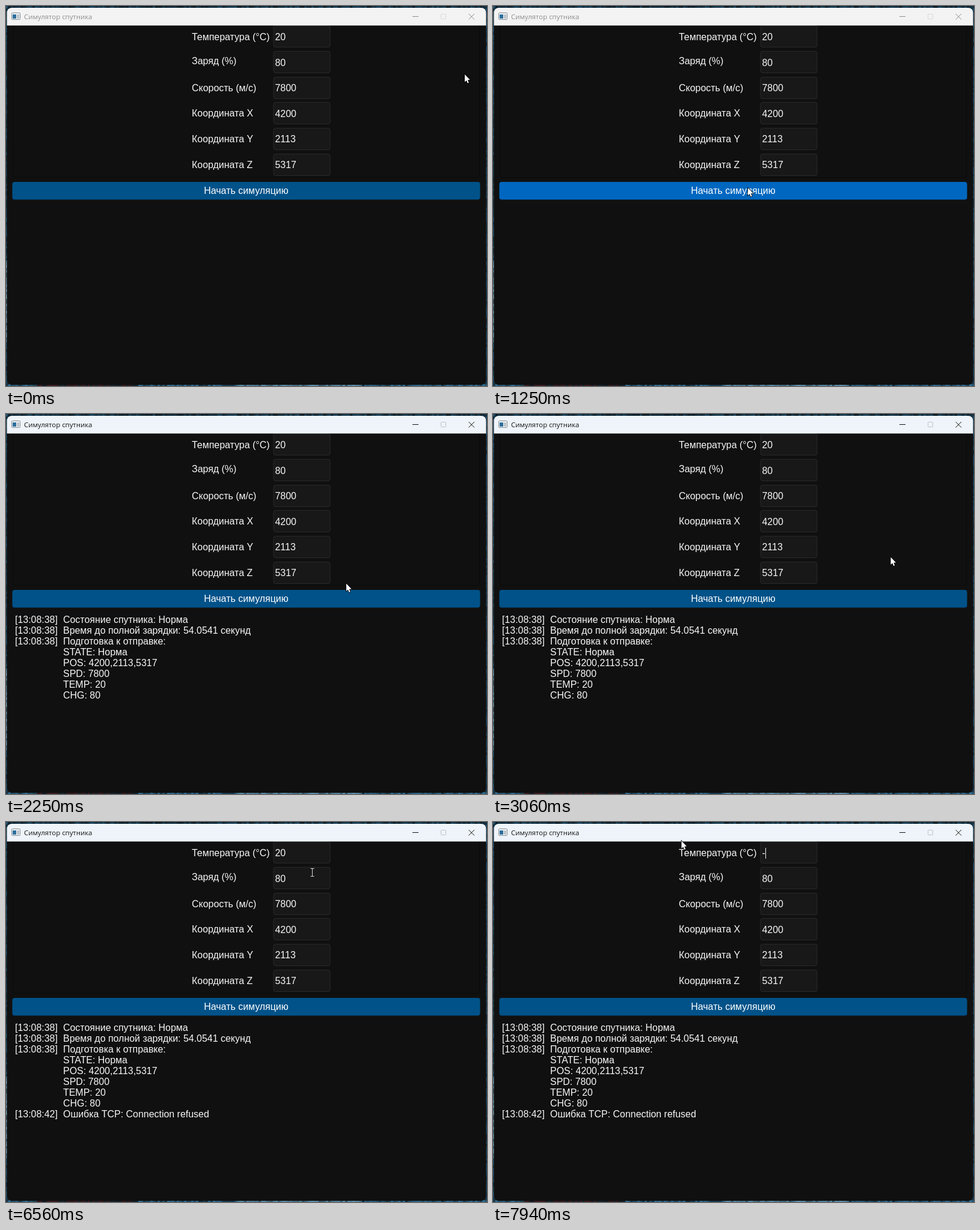
Write an HTML page with a canvas that moves like this. It is 800x633 px and loops after 8000 ms.

```html
<!DOCTYPE html>
<html lang="ru">
<head>
<meta charset="utf-8">
<title>Симулятор спутника</title>
<style>
html, body { margin: 0; width: 100%; height: 100%; overflow: hidden; background: #101010; }
canvas { display: block; }
</style>
</head>
<body>
<canvas id="stage" width="800" height="633"></canvas>
<script>
const LOOP = 8000, CLICK = 1500, REFUSED = 6000;
const DRAG = 6880, RELEASE = 7300, TYPED = 7680;
const SANS = '15.94px "Liberation Sans", Arial, sans-serif';
const c = document.getElementById('stage').getContext('2d');

// label, value, label baseline, field top, value baseline
const ROWS = [
  ['Температура (°C)', '20', 57, 33, 57],
  ['Заряд (%)', '80', 97, 76, 100],
  ['Скорость (м/с)', '7800', 142, 119, 142],
  ['Координата X', '4200', 184, 161, 185],
  ['Координата Y', '2113', 227, 204, 227],
  ['Координата Z', '5317', 270, 247, 270]
];
const LOG = [
  ['[13:08:38]', 'Состояние спутника: Норма'],
  ['[13:08:38]', 'Время до полной зарядки: 54.0541 секунд'],
  ['[13:08:38]', 'Подготовка к отправке:'],
  ['', 'STATE: Норма'],
  ['', 'POS: 4200,2113,5317'],
  ['', 'SPD: 7800'],
  ['', 'TEMP: 20'],
  ['', 'CHG: 80'],
  ['[13:08:42]', 'Ошибка TCP: Connection refused']
];
// pointer waypoints: time, x, y
const PATH = [
  [0, 763, 114], [60, 763, 114], [180, 756, 103], [810, 480, 288], [1250, 424, 303],
  [1500, 417, 310], [1750, 415, 311], [2440, 600, 276], [2780, 728, 262],
  [3060, 661.5, 238.5], [5750, 661.5, 238.5], [6500, 509, 84], [6600, 509, 84],
  [DRAG, 498, 52], [RELEASE, 313.5, 31.5], [LOOP, 313.5, 31.5]
];

function pointer(t) {
  const i = PATH.findIndex(p => p[0] > t);
  const [t0, x0, y0] = PATH[i - 1], [t1, x1, y1] = PATH[i];
  const u = (t - t0) / (t1 - t0), e = u * u * (3 - 2 * u);
  return [x0 + (x1 - x0) * e, y0 + (y1 - y0) * e];
}

function text(s, x, y, color = '#f8f8f8', font = SANS) {
  c.font = font;
  c.fillStyle = color;
  c.fillText(s, x, y);
}

function box(x, y, w, h, r, fill, stroke) {
  c.beginPath();
  c.roundRect(x, y, w, h, r);
  if (fill) { c.fillStyle = fill; c.fill(); }
  if (stroke) { c.strokeStyle = stroke; c.lineWidth = 1; c.stroke(); }
}

function line(color, ...points) {
  c.strokeStyle = color;
  c.lineWidth = 1;
  c.beginPath();
  for (let i = 0; i < points.length; i += 4) {
    c.moveTo(points[i], points[i + 1]);
    c.lineTo(points[i + 2], points[i + 3]);
  }
  c.stroke();
}

// mottled sea-coloured desktop visible around the window
function desktop() {
  const noise = n => { const v = Math.sin(n * 12.9898) * 43758.5453; return v - Math.floor(v); };
  c.fillStyle = '#123344';
  c.fillRect(0, 0, 800, 633);
  for (let i = 0; i < 200; i++) {
    const p = i * 4, n = noise(i + 1), m = noise(i + 301);
    c.fillStyle = `hsl(203 55% ${9 + n * 14}%)`;
    c.fillRect(p, 0, 4, 4);
    const dark = p > 50 && p < 220, foam = p > 380 && p < 590;
    c.fillStyle = dark ? `hsl(${m > .6 ? 350 : 205} 35% ${8 + m * 10}%)`
      : `hsl(202 ${foam ? 30 : 50}% ${(foam ? 28 : 14) + m * 26}%)`;
    c.fillRect(p, 630, 4, 3);
    const pale = p > 420 && p < 560;
    c.fillStyle = `hsl(202 ${pale ? 25 : 50}% ${pale ? 28 + n * 30 : 14 + n * 16}%)`;
    c.fillRect(0, p, 2, 4);
    c.fillStyle = `hsl(204 55% ${13 + m * 14}%)`;
    c.fillRect(798, p, 2, 4);
  }
}

function titleBar(active) {
  box(1.5, 3, 797, 29.5, [8, 8, 0, 0], active ? '#eef4f9' : '#f3f3f3');
  box(9.5, 11.5, 14, 11, 1, '#f8fafb', '#7d858b');
  c.fillStyle = '#2c6f9c';
  c.fillRect(11, 14, 6, 7);
  c.fillStyle = '#b9c3ca';
  c.fillRect(18, 14, 4, 7);
  const ink = active ? '#151515' : '#8e8e8e';
  text('Симулятор спутника', 30, 22, ink, '11.4px "Open Sans", "Noto Sans", sans-serif');
  line(ink, 676, 17.5, 686, 17.5);
  box(723.5, 13.5, 8, 8, 1, null, active ? '#bcc3c8' : '#d8d8d8');
  line(ink, 769.5, 13, 779, 22.5, 779, 13, 769.5, 22.5);
}

function form(t) {
  box(11.5, 25.5, 776, 260, 4, null, '#0a0a0a');
  ROWS.forEach(([label, value, y, top, base], i) => {
    text(label, 309, y);
    box(445, top - .5, 94, 36, 3, '#181818', '#292929');
    if (i || t < TYPED) {
      if (!i && t > DRAG + 60) {
        const left = t > DRAG + 110 ? 448 : 457;
        c.fillStyle = '#0067c0';
        c.fillRect(left, 43, 466 - left, 18);
      }
      text(value, 447.5, base);
    } else {
      text('-', 447.5, base);
      line('#f8f8f8', 453.5, 43, 453.5, 61);
    }
  });
}

function button(hover) {
  box(10.5, 293, 778, 29.5, 4, hover ? '#0067c0' : '#005289');
  c.textAlign = 'center';
  text('Начать симуляцию', 399.5, 313, '#fff');
  c.textAlign = 'left';
}

function log(t) {
  const count = t < CLICK ? 0 : t < REFUSED ? 8 : 9;
  LOG.slice(0, count).forEach(([time, message], i) => {
    const y = Math.round(348.3 + i * 17.93);
    text(time, 15, y);
    text(message, 95, y);
  });
}

function arrow(x, y) {
  const shape = [0, 0, 0, 12.6, 2.9, 10, 4.7, 14.6, 6.7, 13.7, 4.9, 9.3, 8.7, 9];
  c.beginPath();
  for (let i = 0; i < shape.length; i += 2) c.lineTo(x + shape[i], y + shape[i + 1]);
  c.closePath();
  c.strokeStyle = '#000';
  c.lineWidth = 1.4;
  c.stroke();
  c.fillStyle = '#fff';
  c.fill();
}

function beam(x, y) {
  x = Math.round(x) + .5;
  y = Math.round(y);
  line('#d8d8d8', x, y - 6, x, y + 6, x - 3, y - 6.5, x + 3, y - 6.5, x - 3, y + 6.5, x + 3, y + 6.5);
}

function draw(t) {
  const [x, y] = pointer(t);
  const inField = x > 445 && x < 539 && ROWS.some(r => y > r[3] && y < r[3] + 36);
  const dragging = t > DRAG && t < RELEASE;
  desktop();
  box(1.5, 3, 797, 628, 8, '#101010');
  form(t);
  button(x > 10 && x < 789 && y > 293 && y < 323);
  log(t);
  titleBar(t >= CLICK);
  (inField || dragging ? beam : arrow)(x, y);
}

const start = performance.now();
function tick() {
  draw((performance.now() - start) % LOOP);
  requestAnimationFrame(tick);
}
tick();
</script>
</body>
</html>
```
